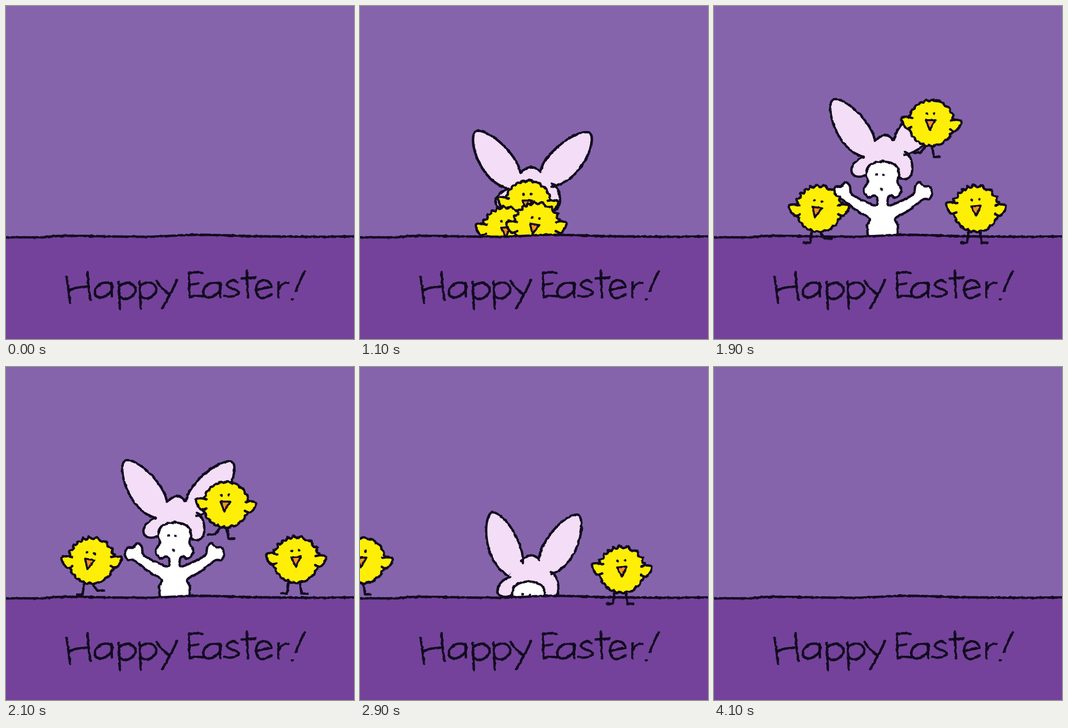
Write an HTML page that moves like this. It is 700x671 px and loops after 4300 ms.

```html
<!DOCTYPE html>
<html lang="en">
<head>
<meta charset="utf-8">
<title>Happy Easter!</title>
<style>
  html, body { margin: 0; height: 100%; overflow: hidden; background: #8564ac; }
  svg { display: block; width: 100vw; height: 100vh; }
  #scene { fill: none; stroke: #120a20; stroke-width: 4.8; stroke-linecap: round; stroke-linejoin: round; }
</style>
</head>
<body>
<svg viewBox="0 0 700 671" role="img" aria-label="Happy Easter!">
  <filter id="rough" filterUnits="userSpaceOnUse" x="-20" y="-20" width="740" height="711" color-interpolation-filters="sRGB">
    <feTurbulence type="fractalNoise" baseFrequency="0.13" numOctaves="2" seed="4"/>
    <feDisplacementMap in="SourceGraphic" scale="3.5" xChannelSelector="R" yChannelSelector="G"/>
  </filter>
  <g id="scene" filter="url(#rough)"></g>
</svg>
<script>
const PINK = '#f4ddf6', YELLOW = '#ffee06', ORANGE = '#f7941d', INK = '#120a20', GROUND = '#74429b';
const scene = document.getElementById('scene');

const parse = text => text.trim().split(/\s+/).map(pair => pair.split(',').map(Number));
const path = (d, fill = 'none', extra = '') => `<path d="${d}" fill="${fill}" ${extra}/>`;
const dot = (x, y) => `<circle cx="${x}" cy="${y}" r="2.7" fill="${INK}" stroke="none"/>`;
const group = (transform, content) => `<g transform="${transform}">${content}</g>`;

// Catmull-Rom curve through the points, as SVG path data
function curve(points) {
  const at = i => points[Math.max(0, Math.min(points.length - 1, i))];
  let d = 'M' + points[0];
  for (let i = 0; i < points.length - 1; i++) {
    const [p, a, b, n] = [at(i - 1), at(i), at(i + 1), at(i + 2)];
    const c1 = a.map((v, k) => (v + (b[k] - p[k]) / 6).toFixed(1));
    const c2 = b.map((v, k) => (v - (n[k] - a[k]) / 6).toFixed(1));
    d += `C${c1} ${c2} ${b}`;
  }
  return d;
}

// Ground with hand lettering
const letterA = 'q-14-6-25 2t-7 21q10 9 24-1t8-24l1 28';
const letterP = 'l2 55m0-47q16-12 27-1t-3 22-24 0';
const lettering = [
  'M122 546L129 598M164 536Q165 565 170 592M128 572Q145 565 167 566',
  'M212 560' + letterA, 'M227 556' + letterP, 'M269 555' + letterP,
  'M303 554Q312 570 328 580M344 552Q332 580 314 609',
  'M395 538Q382 535 368 538L369 586Q383 583 397 585M369 562L387 559',
  'M430 560' + letterA,
  'M465 556Q455 550 447 557T457 570 464 582 439 584',
  'M484 533L487 587M474 549L502 547',
  'M502 572L534 566Q531 552 517 553T503 573Q507 600 534 581',
  'M548 557L548 587M548 574Q555 554 568 558',
  'M601 534Q590 555 583 574M575 591h2'
].join('');
const ground =
  `<rect x="-20" y="465" width="740" height="230" fill="${GROUND}" stroke="none"/>` +
  path(curve(parse('-20,466 70,466 120,463 280,465 385,461 510,464 620,465 720,464')), GROUND) +
  path(lettering);

// Figure in the rabbit hood
const ear = path('M324 272C318 235 265 183 240 188C222 200 245 290 301 304', PINK);
const hood =
  path('M324 272Q345 250 361 270L384 294C402 298 410 362 373 346L306 341C270 355 265 318 301 304Z', PINK, `style="stroke:${PINK}"`);
const hoodLines =
  path('M324 272Q345 250 361 270M384 294C402 298 410 362 373 346M301 304C265 318 270 355 306 341');
const head = '339,313 323,316 311,323 306,337 309,355 302,367 304,380 313,386 322,382 328,387 326,402 ';
const arm = '300,392 277,379 273,362 264,355 256,363 245,364 239,376 245,389 258,390 288,413 ';
const torso = '313,428 308,444 311,475';

function bunny({ dy, sx = 1, fold = 0, arms = true }) {
  const left = parse(head + (arms ? arm : '') + torso);
  const right = left.map(([x, y]) => [678 - x, y]).reverse();
  return group(`translate(${345 * (1 - sx)} ${dy}) scale(${sx} 1)`,
    hood +
    group(`rotate(${fold} 312 288)`, ear) +
    group(`translate(685 -5) scale(-1 1) rotate(${0.7 * fold - 6} 312 288)`, ear) +
    hoodLines + path(curve([...right, ...left]), '#fff') +
    dot(327, 339) + dot(341, 340) + dot(337, 369));
}

// Chicks: one build, three moods
function fluff(spiky) {
  const count = 120;
  return 'M' + Array.from({ length: count }, (_, i) => {
    const a = i / count * 2 * Math.PI;
    const wave = Math.abs(Math.sin(10 * a + Math.sin(3 * a)));
    const r = spiky && Math.sin(a) < -0.2 ? 44 + 6 * (1 - wave) : 44 + 3 * wave;
    return [r * Math.cos(a), r * Math.sin(a)].map(v => v.toFixed(1));
  }).join('L') + 'Z';
}
const leg = (hip, side, bent) =>
  path(bent ? `M${hip} 47l${10 * side} 13h${14 * side}` : `M${hip} 46l${3 * side} 22h${12 * side}`);

function buildChick({ spiky, face, wings, bent }) {
  const wing = path(curve(parse('39,-9 49,-11 60,-9 57,3 49,12 39,9')), YELLOW);
  return leg(bent < 0 ? -12 : -15, -1, bent < 0) + leg(bent ? 2 : 8, 1, bent > 0) +
    path(fluff(spiky), YELLOW) +
    group(`scale(-1 1) rotate(${wings[0]})`, wing) + group(`rotate(${wings[1]})`, wing) +
    group(face, dot(-8, -19) + dot(7, -19) + path('M-10 -6L9 -6L-2 14Z', ORANGE, 'stroke-width="4"'));
}
const chickArt = {
  A: buildChick({ spiky: false, face: 'translate(-1 0)', wings: [-2, 5], bent: -1 }),
  B: buildChick({ spiky: true, face: 'translate(-4 3) rotate(9)', wings: [2, 2], bent: 1 }),
  C: buildChick({ spiky: true, face: 'translate(1 0) rotate(-5)', wings: [-3, 2], bent: 0 })
};
const chick = ({ x, y, mood }) => group(`translate(${x} ${y})`, chickArt[mood]);

// Each flight passes key points [step, x, y, mood]; once landed, the chick hops on every second step
const flights = [
  { lands: 6, keys: [[0, 376, 303, 'A'], [2, 437, 236, 'A'], [5, 453, 360, 'B'], [6, 490, 409, 'C'], [9, 600, 409, 'A'], [12, 727, 409, 'B']] },
  { lands: 2, keys: [[0, 250, 355, 'A'], [2, 211, 409, 'B'], [5, 94, 411, 'A'], [7, 5, 409, 'A']] },
  { lands: 0, keys: [[0, 409, 409, 'A'], [2, 527, 409, 'C'], [5, 696, 405, 'B']] }
];
function flying({ lands, keys }, step) {
  const next = keys.findIndex(key => key[0] > step);
  const i = next < 0 ? keys.length - 1 : next - 1;
  const [start, x, y, mood] = keys[i];
  if (next < 0 && step > start) return '';
  const [end, x2, y2] = keys[i + 1] || [start + 1, x, y];
  const part = (step - start) / (end - start);
  const hop = step >= lands && (step - lands) % 2 === (lands === 6 ? 0 : 1) ? 19 : 0;
  return chick({ x: x + (x2 - x) * part, y: y + (y2 - y) * part - hop, mood });
}

// Timeline in steps: rise with the pile, let the chicks leap, sink again
const LEAP = 6, SINK = 12, GONE = 16;
const pile = [{ x: 338, y: 334, mood: 'A' }, { x: 293, y: 388, mood: 'C' }, { x: 355, y: 379, mood: 'B' }];

function draw(step) {
  let behind = '', front = '';
  if (step > 0 && step < LEAP) {
    const dy = Math.max(0, 268 - 204 * ((step - 1) / 3) ** 1.2);
    behind = bunny({ dy, sx: 1.06, arms: false }) + pile.map(c => chick({ ...c, y: c.y + dy })).join('');
  } else if (step >= LEAP) {
    const down = step - SINK;
    if (step < GONE) behind = bunny(down < 0 ? { dy: 0 } : { dy: 47 + 72 * down, fold: 4 + 10 * down });
    front = flights.map(flight => flying(flight, step - LEAP)).join('');
  }
  scene.innerHTML = behind + ground + front;
}

let shown = -1;
function tick() {
  const t = performance.now() % 4300;
  const step = t < 500 ? 0 : 1 + Math.floor((t - 500) / 200);
  if (step !== shown) draw(shown = step);
  requestAnimationFrame(tick);
}
tick();
</script>
</body>
</html>
```
